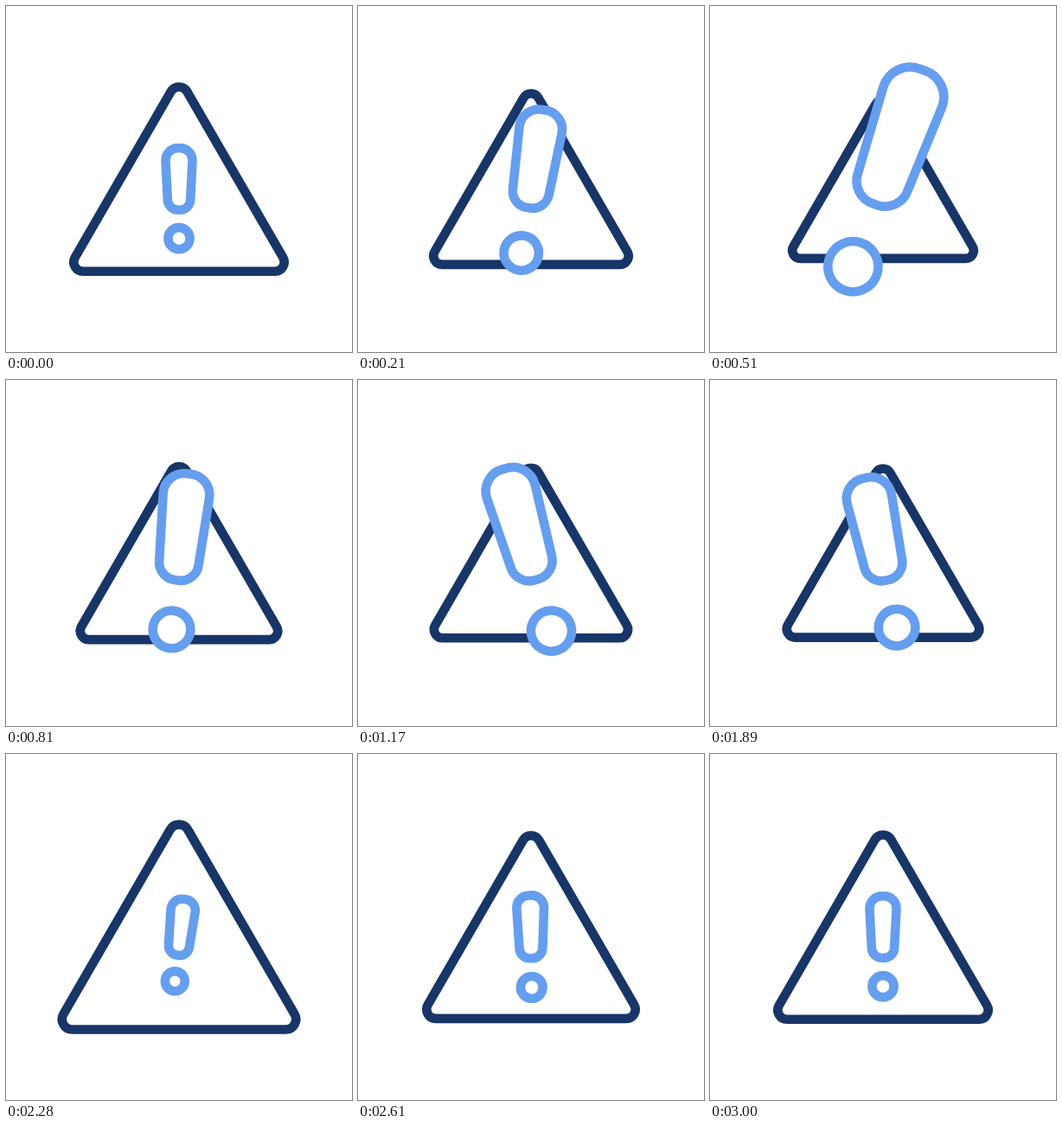
Recreate the animation shown at these times as an HTML page without scripts. Size 400 by 400 pixels, loop 3.03 s.

```html
<!DOCTYPE html>
<html lang="en">
<head>
<meta charset="utf-8">
<title>Warning sign</title>
<style>
  html, body { margin: 0; width: 100%; height: 100%; overflow: hidden; background: #fff; }
  svg { display: block; width: 100vw; height: 100vh; }

  path, circle { fill: #fff; stroke-width: 10.6; vector-effect: non-scaling-stroke; }
  .sign { stroke: #183568; }
  .mark { stroke: #659eee; }

  .sign, .mark {
    transform-origin: 0 0;
    animation: 3030ms cubic-bezier(.37, 0, .63, 1) infinite;
  }
  .sign { translate: 200px 200px; animation-name: pulse; }
  .mark { translate: 200px 223.5px; animation-name: grow, swing; }

  @keyframes pulse {
    0% { scale: 1; }
    13.86% { scale: .854; }
    30.69% { scale: .951; }
    51.16% { scale: .86; }
    54.46% { scale: .86; animation-timing-function: cubic-bezier(.5, 0, .75, .4); }
    62.38% { scale: .914; animation-timing-function: cubic-bezier(.35, .35, .5, 1); }
    72.77% { scale: 1.123; }
    85.48% { scale: .992; }
    95.71%, 100% { scale: 1; }
  }

  @keyframes grow {
    0% { scale: 1; translate: 200px 223.5px; }
    14.85% { scale: 2.34; translate: 200px 202.3px; }
    30.03% { scale: 1.66; translate: 200px 211.5px; }
    52.81%, 53.8% { scale: 2.33; translate: 200px 203.3px; }
    72.28% { scale: .9; translate: 200px 221.3px; }
    85.48% { scale: 1.02; translate: 200px 223.8px; }
    95.71%, 100% { scale: 1; translate: 200px 223.5px; }
  }

  @keyframes swing {
    0% { rotate: 0deg; }
    14.85% { rotate: 19.8deg; }
    44.88% { rotate: -20.2deg; }
    56.1% { rotate: -20.6deg; }
    72.94% { rotate: 7.2deg; }
    85.48% { rotate: -1deg; }
    95.71%, 100% { rotate: 0deg; }
  }
</style>
</head>
<body>
<svg viewBox="0 0 400 400">
  <g class="sign">
    <path d="M-9.2-101.3A10.7 10.7 0 0 1 9.2-101.3L120.2 90.6A10.7 10.7 0 0 1 111 106.7H-111A10.7 10.7 0 0 1-120.2 90.6Z"/>
  </g>
  <g class="mark">
    <path d="M-1.5-59.2H1.5A14 14 0 0 1 15.5-44.7L13.2.2A12 12 0 0 1 1.2 12.2H-1.2A12 12 0 0 1-13.2.2L-15.5-44.7A14 14 0 0 1-1.5-59.2Z"/>
    <circle cy="45.2" r="12.6"/>
  </g>
</svg>
</body>
</html>
```
